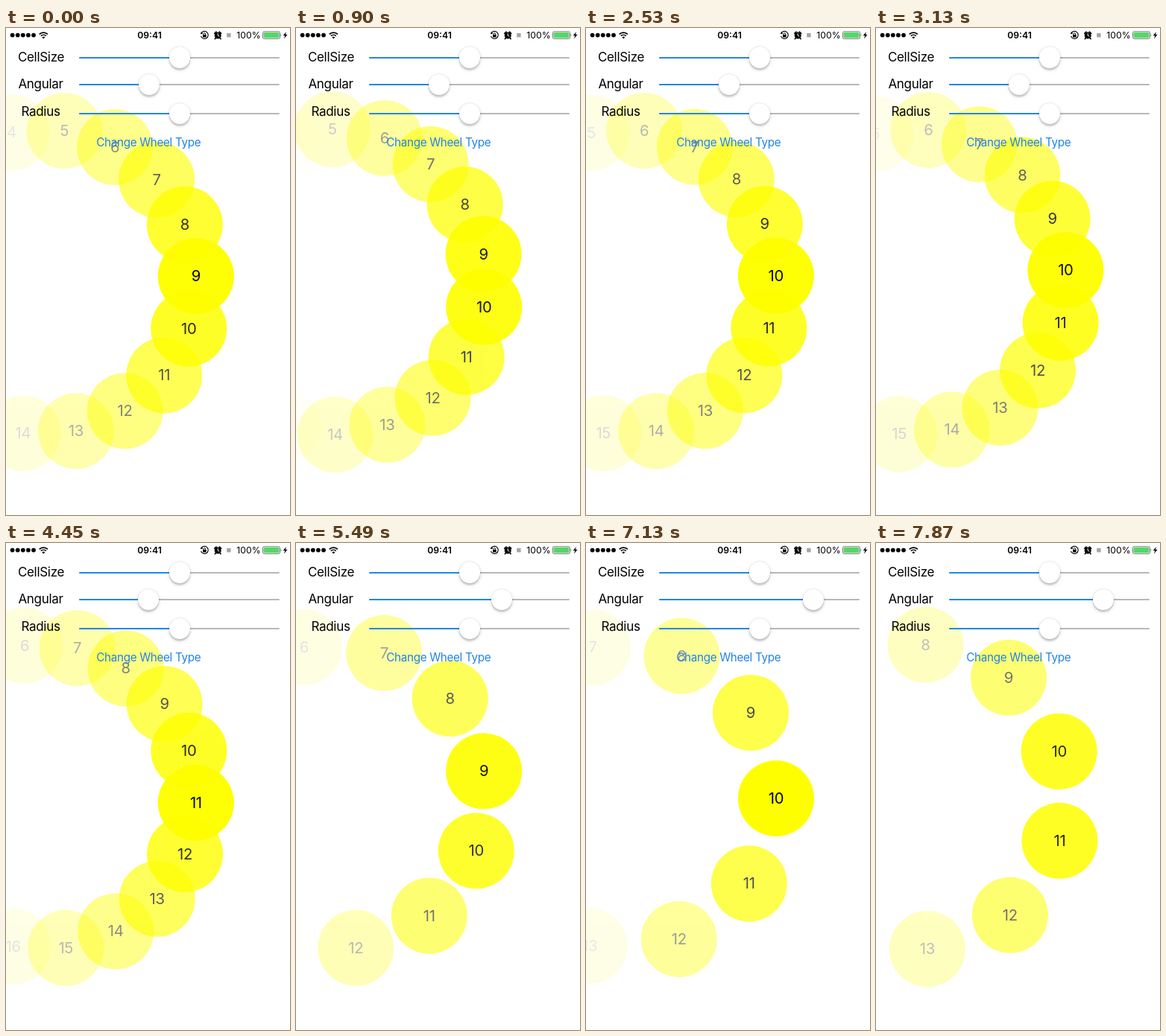
Recreate the animation shown at these times as an HTML page. Size 381x654 px, loop 8000 ms.

```html
<!DOCTYPE html>
<html lang="en">
<head>
<meta charset="utf-8">
<title>Wheel layout</title>
<style>
  html, body { margin: 0; width: 100%; height: 100%; overflow: hidden; background: #fff; }
  #stage { position: relative; width: 381px; height: 654px; overflow: hidden; font-family: Inter, "Open Sans", sans-serif; }
  #wheel { position: absolute; inset: 0; isolation: isolate; }
  .cell {
    position: absolute; left: -51px; top: -51px; width: 102px; height: 102px;
    border-radius: 50%; background: #fefe00; color: #000;
    font-size: 20.3px; line-height: 102px; letter-spacing: -.3px; text-align: center;
  }
  svg { position: absolute; left: 0; top: 0; }
  .label { font-size: 17px; letter-spacing: -.3px; text-anchor: middle; }
  .link { font-size: 15.2px; letter-spacing: -.3px; text-anchor: middle; fill: #1f83e6; }
  .bar { font-size: 12.2px; text-anchor: middle; }
  .track { position: absolute; left: 98px; width: 269px; height: 2px; border-radius: 1px; background: #b8b8b8; }
  .fill { height: 2px; border-radius: 1px; background: #2287e8; }
  .knob {
    position: absolute; top: -13.3px; left: -14.3px; width: 28.6px; height: 28.6px;
    border-radius: 50%; background: #fff;
    box-shadow: 0 0 0 .5px rgba(0,0,0,.1), 0 3px 1px rgba(0,0,0,.1), 0 2px 5px rgba(0,0,0,.18);
  }
</style>
</head>
<body>
<div id="stage">
  <div id="wheel"></div>
  <svg width="381" height="654" viewBox="0 0 381 654">
    <g id="signal"></g>
    <g fill="none" stroke="#000" stroke-width="1.7">
      <path d="M44.7 8.4a8 8 0 0 1 11.2 0M46.9 10.6a4.9 4.9 0 0 1 6.8 0"/>
    </g>
    <path d="M50.3 14.4l-1.9-2a2.7 2.7 0 0 1 3.8 0z"/>
    <text class="bar" x="192.5" y="14" font-weight="600">09:41</text>

    <!-- rotation lock -->
    <path d="M262.2 6.4a5 5 0 1 1-.7 4.6" fill="none" stroke="#000" stroke-width="1.1"/>
    <path d="M260.4 7.8l3.6.3-1.3-3.2z"/>
    <rect x="264" y="9" width="4.6" height="3.5" rx=".5"/>
    <path d="M265 9V8a1.3 1.3 0 0 1 2.6 0v1" fill="none" stroke="#000" stroke-width=".9"/>

    <!-- alarm -->
    <circle cx="284.2" cy="10" r="4.5"/>
    <path d="M279.7 7.3l2.4-2.3M288.7 7.3l-2.4-2.3M281.3 13.4l-1 1.3M287.1 13.4l1 1.3" stroke="#000" stroke-width="1.6" stroke-linecap="round"/>
    <path d="M284.2 7.2v3l2 1" fill="none" stroke="#fff" stroke-width="1"/>

    <rect x="296.2" y="7" width="5.4" height="5.4" fill="#a5a5a5"/>
    <text class="bar" x="325.5" y="14">100%</text>
    <rect x="344.5" y="4.8" width="23" height="9.6" rx="1.8" fill="#fff" stroke="#555" stroke-width=".8"/>
    <rect x="345.6" y="5.9" width="20.8" height="7.4" rx="1" fill="#55d769"/>
    <path d="M368.7 7.8q1.6 1.8 0 3.6z" fill="#555"/>
    <path d="M376 5l-4.3 5.2h2.6l-1.3 4.2 4.6-5.6h-2.7z"/>

    <text class="label" x="47" y="45">CellSize</text>
    <text class="label" x="46.5" y="81.4">Angular</text>
    <text class="label" x="46.5" y="117.6">Radius</text>
    <text class="link" x="191.3" y="158.7">Change Wheel Type</text>
  </svg>
  <div id="sliders"></div>
</div>
<script>
const LOOP = 8000, TICKS = 54;
const HUB = { x: 50, y: 341, r: 205 };
const FADE = 113; // degrees at which a cell is fully transparent

// [tick, value] keys: index facing right, and the Angular knob's x
const scrollKeys = [[0, 9.11], [12, 9.89], [21, 10.225], [24, 10.25], [25, 10.25],
  [30, 10.89], [37, 9.32], [41, 9.15], [44, 9.54], [53, 10.51]];
const knobKeys = [[25, 192], [30, 191], [37, 276], [41, 305]];

const slope = (a, b) => (b[1] - a[1]) / (b[0] - a[0]);

function tangent(keys, i) {
  if (i === 0) return slope(keys[0], keys[1]);
  if (i === keys.length - 1) return slope(keys[i - 1], keys[i]);
  const a = slope(keys[i - 1], keys[i]), b = slope(keys[i], keys[i + 1]);
  return a * b > 0 ? 2 * a * b / (a + b) : 0;
}

// Monotone cubic through the keys, constant outside them
function follow(keys, t) {
  const last = keys.length - 1;
  if (t <= keys[0][0]) return keys[0][1];
  if (t >= keys[last][0]) return keys[last][1];
  const i = keys.findIndex(k => k[0] > t) - 1;
  const [t0, v0] = keys[i], [t1, v1] = keys[i + 1];
  const d = t1 - t0, u = (t - t0) / d, w = 1 - u;
  return v0 * (1 + 2 * u) * w * w + v1 * u * u * (3 - 2 * u)
    + d * u * w * (tangent(keys, i) * w - tangent(keys, i + 1) * u);
}

function add(parent, cls, text = "") {
  const el = document.createElement("div");
  el.className = cls;
  el.textContent = text;
  parent.append(el);
  return el;
}

function makeSlider(y) {
  const track = add(document.getElementById("sliders"), "track");
  track.style.top = y - 1 + "px";
  const fill = add(track, "fill"), knob = add(track, "knob");
  return x => {
    fill.style.width = x - 98 + "px";
    knob.style.transform = `translateX(${x - 98}px)`;
  };
}

const wheel = document.getElementById("wheel");
const cells = Array.from({ length: 21 }, (_, i) => add(wheel, "cell", i));
const [setSize, setAngular, setRadius] = [39.5, 76.2, 115].map(makeSlider);
setSize(233);
setRadius(233);

document.getElementById("signal").innerHTML =
  [0, 1, 2, 3, 4].map(i => `<circle cx="${8.6 + i * 7.1}" cy="9.6" r="2.9"/>`).join("");

function draw(tick) {
  const knob = follow(knobKeys, tick), front = follow(scrollKeys, tick);
  const spacing = 10 + 30 * (knob - 112) / 241;
  setAngular(knob);
  cells.forEach((cell, i) => {
    const deg = (i - front) * spacing, rad = deg * Math.PI / 180;
    const alpha = Math.max(0, 1 - Math.abs(deg) / FADE);
    cell.style.opacity = alpha;
    cell.style.visibility = alpha ? "visible" : "hidden";
    cell.style.zIndex = Math.round(alpha * 1000);
    cell.style.transform =
      `translate(${HUB.x + HUB.r * Math.cos(rad)}px, ${HUB.y + HUB.r * Math.sin(rad)}px)`;
  });
}

// The screen refreshes in even ticks, about seven a second
let start, shown = -1;
function frame(now) {
  start ??= now;
  const tick = Math.floor((now - start) % LOOP / LOOP * TICKS);
  if (tick !== shown) draw(shown = tick);
  requestAnimationFrame(frame);
}
draw(0);
requestAnimationFrame(frame);
</script>
</body>
</html>
```
